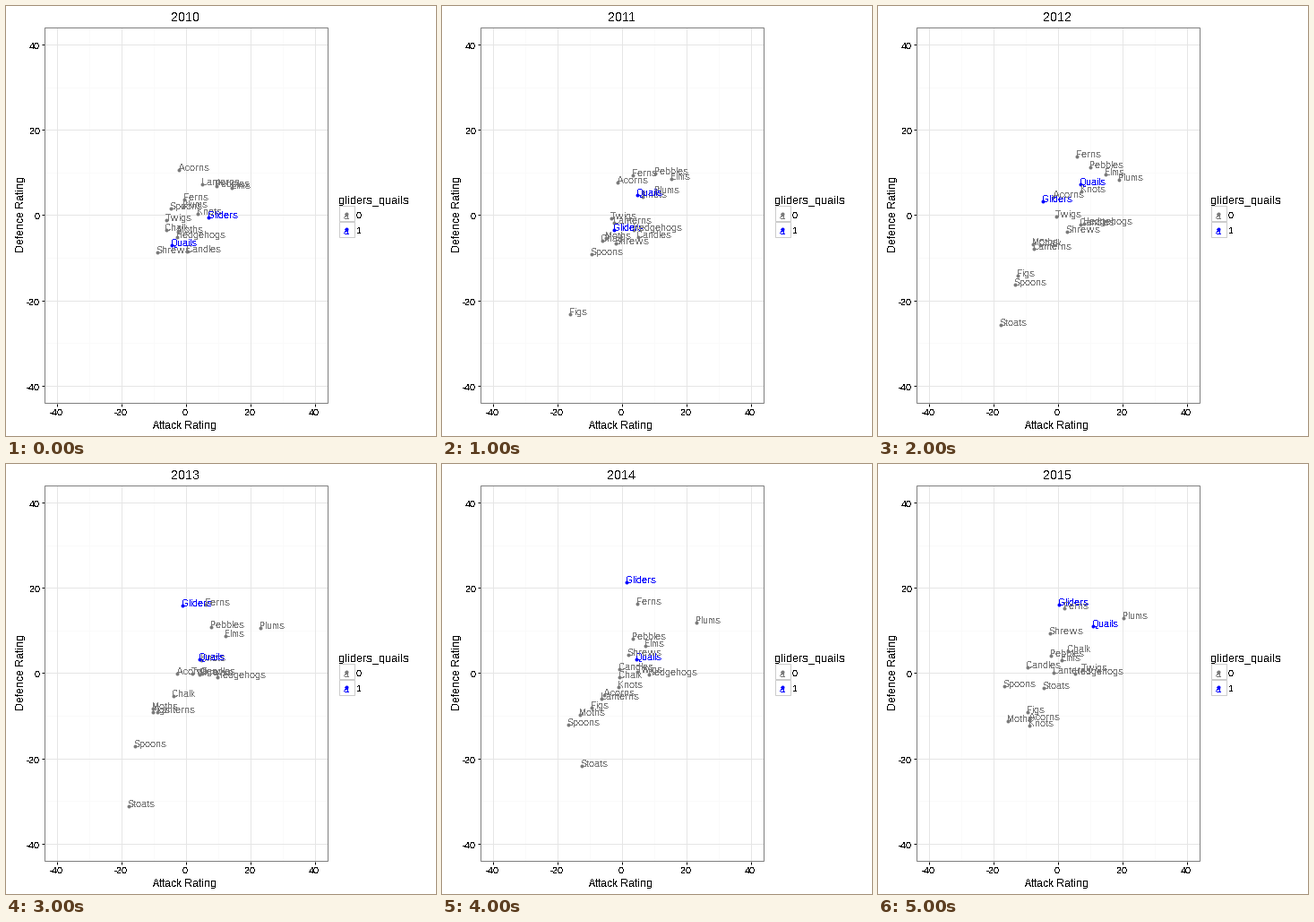
Write a matplotlib script that moves like this. It is 480x480 px and loops after 6000 ms.

```python
from math import pi, sin

import matplotlib.pyplot as plt
from matplotlib.animation import FuncAnimation
from matplotlib.patches import Rectangle

plt.rcParams.update({
    "font.family": "Liberation Sans",
    "text.hinting": "native",
    "text.hinting_factor": 1,
    "text.antialiased": False,
})

SIZE, DPI = 480, 96
PX = 72 / DPI  # points per pixel
GREY, BLUE = "#7a7a7a", "#0000ff"
YEARS = range(2010, 2016)

fig = plt.figure(figsize=(SIZE / DPI, SIZE / DPI), dpi=DPI, facecolor="white")
ax = fig.add_axes([0, 0, 1, 1])
ax.set_xlim(0, SIZE)
ax.set_ylim(SIZE, 0)
ax.axis("off")


def line(x0, y0, x1, y1, color, z):
    ax.plot([x0, x1], [y0, y1], color=color, lw=PX,
            solid_capstyle="butt", zorder=z)


def box(x0, y0, x1, y1, color, z):
    ax.add_patch(Rectangle((x0, y0), x1 - x0, y1 - y0,
                           fill=False, ec=color, lw=PX, zorder=z))


def label(x, y, s, size, ha="left", color="black"):
    # text bitmaps carry a one-pixel margin
    return ax.text(x - 1, y, s, fontsize=size * PX, ha=ha, va="baseline",
                   color=color, zorder=6)


def dot(x, y, color):
    return ax.plot([x], [y], "o", ms=4 * PX, mew=0, color=color, zorder=5)[0]


def sx(v):
    return round(201 + 3.6 * v)


def sy(v):
    return round(233.4 - 4.76 * v)


# panel
LEFT, TOP, RIGHT, BOTTOM = 43, 24, 359, 443
MAJOR = range(-40, 41, 20)
for values, color, z in ((range(-30, 31, 20), "#fafafa", 1),
                         (MAJOR, "#e5e5e5", 2)):
    for v in values:
        line(sx(v), TOP, sx(v), BOTTOM, color, z)
        line(LEFT, sy(v), RIGHT, sy(v), color, z)
box(LEFT, TOP, RIGHT, BOTTOM, "#7f7f7f", 7)

for v in MAJOR:
    line(sx(v), BOTTOM + 1, sx(v), BOTTOM + 4, "black", 3)
    line(LEFT - 3, sy(v), LEFT, sy(v), "black", 3)
    label(sx(v), 457, str(v), 10, "center")
    label(39, sy(v) + 5, str(v), 10, "right")

label(201, 472, "Attack Rating", 12, "center")
ax.text(22, 232.5, "Defence Rating", fontsize=12 * PX, rotation=90,
        ha="right", va="center", zorder=6)
title = label(201.5, 17, "", 14, "center")

# legend
label(372, 220, "gliders_quails", 12)
for i, color in enumerate((GREY, BLUE)):
    top = 223 + 18 * i
    box(372, top, 389, top + 17, "#cccccc", 3)
    y = 232 + 17 * i
    dot(380, y, color)
    label(381, y + 6, "a", 11, "center", color)
    label(392, y + 5, str(i), 10)

seasons = [[] for _ in YEARS]


def club(name, start, end, bow=(0, 0), swing=(0, 0), since=0, color=GREY):
    """Drift from start to end, bent by a half wave and a full wave."""
    for i in range(since, len(YEARS)):
        t = i / (len(YEARS) - 1)
        x, y = (round(a + (b - a) * t + h * sin(pi * t) + f * sin(2 * pi * t))
                for a, b, h, f in zip(start, end, bow, swing))
        seasons[i] += [dot(x, y, color), label(x, y + 1, name, 11, color=color)]


club("Knots", (214, 232), (169, 292), (33, -52))
club("Candles", (202, 274), (167, 227), (40, -12))
club("Lanterns", (219, 199), (196, 233), (-38, 61))
club("Elms", (252, 203), (205, 219), (22, -22))
club("Twigs", (179, 239), (228, 230))
club("Spoons", (184, 226), (141, 248), (-15, 80))
club("Gliders", (226, 236), (202, 157), (-25, -9), (-15, 37), color=BLUE)
club("Quails", (185, 267), (240, 181), (9, -16), (18, -31), color=BLUE)
club("Stoats", (185, 120), (185, 250), (-50, 193), since=2)
club("Plums", (198, 224), (274, 172), (43, -10))
club("Hedgehogs", (191, 258), (220, 234), (29, -6))
club("Moths", (192, 252), (145, 287))
club("Pebbles", (235, 201), (193, 214), (20, -28))
club("Chalk", (179, 250), (212, 209), (-12, 35))
club("Acorns", (193, 183), (169, 285), (13, -11))
club("Figs", (127, 397), (167, 277), (14, -50), since=1)
club("Ferns", (199, 216), (208, 161), (20, -27))
club("Shrews", (169, 275), (192, 189), (35, 12))


def show(i):
    title.set_text(str(YEARS[i]))
    for k, season in enumerate(seasons):
        for artist in season:
            artist.set_visible(k == i)
    return [title, *seasons[i]]


anim = FuncAnimation(fig, show, frames=len(YEARS), interval=1000,
                     init_func=lambda: show(0), repeat=True, repeat_delay=0)
plt.show()
```
